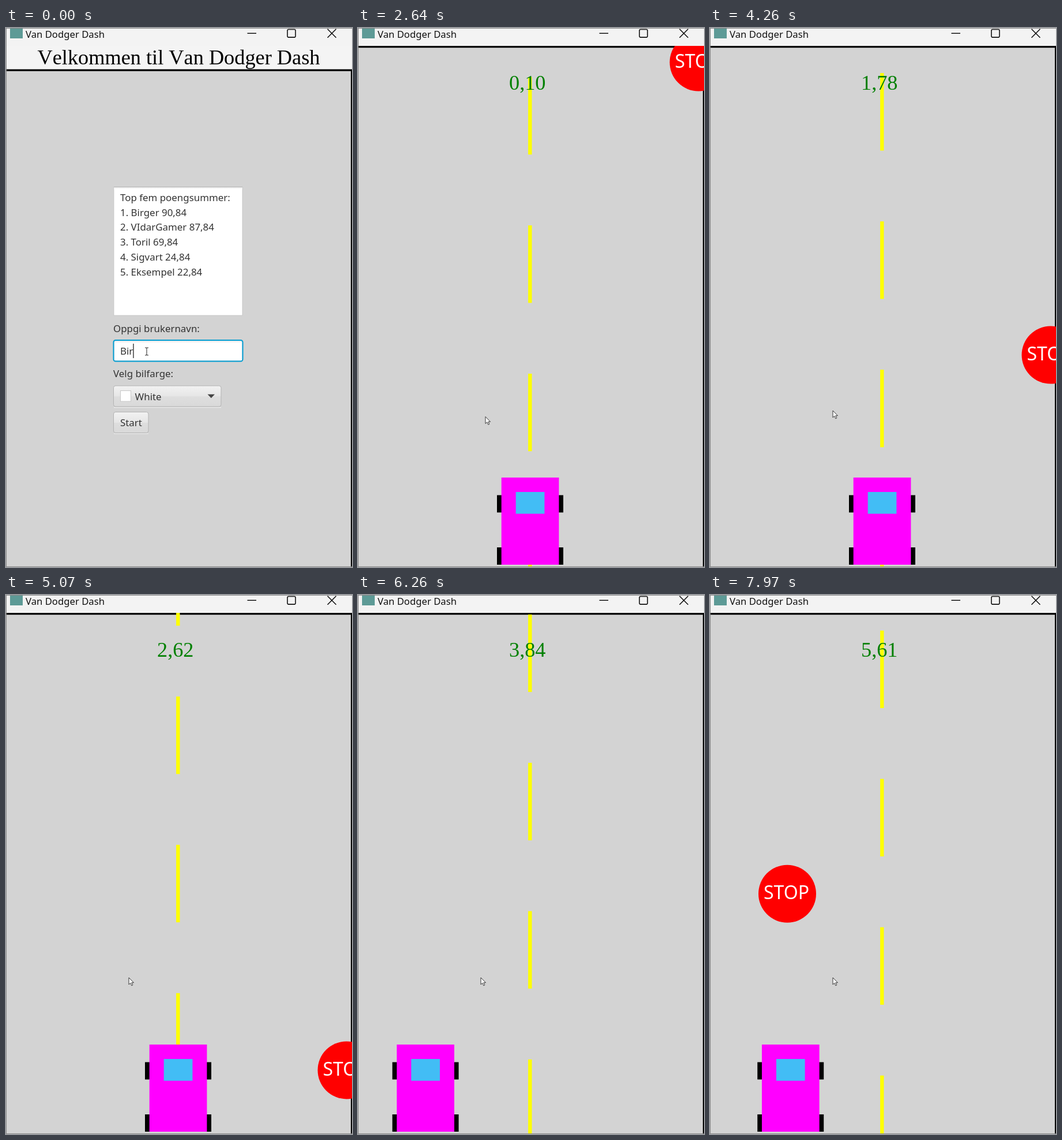
An HTML page for the animation above (8000 ms loop, 600 px wide and 934 px high).

```html
<!DOCTYPE html>
<html lang="no">
<head>
<meta charset="utf-8">
<title>Van Dodger Dash</title>
<style>
  html, body { margin: 0; width: 100%; height: 100%; overflow: hidden; background: #d3d3d3; }
  svg { display: block; width: 100vw; height: 100vh; }
  text { font: 16.9px "Noto Sans", sans-serif; fill: #333; white-space: pre; }
  .serif { font: 36.3px "Liberation Serif", serif; font-kerning: none; fill: #000; }
  .score { fill: #008000; }
  .stop { font-size: 32px; fill: #fff; }
  .btn { fill: url(#face); stroke: #b3b3b3; }
  .pressed { filter: brightness(.93); }
  #ring { fill: none; stroke: #039ed3; stroke-width: 2; }
  #pick { stroke: #1a9bcb; stroke-width: 2; filter: drop-shadow(0 0 2px #039ed3aa); }
</style>
</head>
<body>
<svg viewBox="0 0 600 934">
  <defs>
    <linearGradient id="face" x2="0" y2="1">
      <stop offset="0" stop-color="#f2f2f2"/>
      <stop offset=".5" stop-color="#e6e6e6"/>
      <stop offset=".52" stop-color="#dedede"/>
      <stop offset="1" stop-color="#d9d9d9"/>
    </linearGradient>
    <linearGradient id="inset" x2="0" y2="1">
      <stop offset="0" stop-color="#e8e8e8"/>
      <stop offset="1" stop-color="#fff"/>
    </linearGradient>
    <filter id="shadow" x="-10%" y="-10%" width="120%" height="120%">
      <feDropShadow dx="0" dy="0" stdDeviation="2.5" flood-opacity=".4"/>
    </filter>
    <clipPath id="view"><rect y="31" width="600" height="903"/></clipPath>
    <g id="sign">
      <circle r="50" fill="red"/>
      <text class="stop" x="-41" y="9.5">STOP</text>
    </g>
  </defs>

  <rect width="600" height="934" fill="#d3d3d3"/>
  <rect width="600" height="31" fill="#f3f3f3"/>

  <g id="menu">
    <rect y="31" width="600" height="41" fill="#f4f4f4"/>
    <rect y="71.5" width="600" height="3.2"/>
    <rect x="598" y="72" width="2" height="862"/>
    <text class="serif" x="54.5" y="63">Velkommen til Van Dodger Dash</text>

    <rect x="187" y="275.5" width="223" height="222.5" fill="#fff" stroke="#c4c4c4" stroke-width=".8"/>
    <rect x="187.5" y="275.5" width="222" height="4" fill="url(#inset)"/>
    <path d="M187 275.5h223" stroke="#b5b5b5"/>
    <g id="list"></g>

    <text x="186" y="526.7">Oppgi brukernavn:</text>
    <rect x="187" y="541.5" width="223" height="35.5" rx="3" fill="#fff" stroke="#bdbdbd"/>
    <rect x="188" y="542" width="221.5" height="4" fill="url(#inset)"/>
    <text id="field" x="198" y="566"></text>
    <rect id="caret" y="547" width="1.3" height="25" fill="#222"/>

    <text x="186" y="605.3">Velg bilfarge:</text>
    <rect x="187" y="657" width="186" height="1.2" fill="#ececec"/>
    <rect id="picker" class="btn" x="186.5" y="620" width="186.5" height="36" rx="3.5"/>
    <rect id="swatch" x="198.5" y="628.5" width="18" height="18.5" stroke="#c8c8c8"/>
    <text id="colour" x="223.5" y="644.5"></text>
    <path d="M349.5 634.8h12.5l-6.2 6.4z" fill="#444"/>

    <rect x="187" y="702.3" width="60" height="1.2" fill="#ececec"/>
    <rect id="start" class="btn" x="186.5" y="665.5" width="60.5" height="36" rx="3.5"/>
    <text x="198" y="690">Start</text>
    <rect id="ring" x="186.5" height="36.5" rx="3.5"/>

    <g id="popup">
      <rect x="187.5" y="658" width="325" height="300" rx="8" fill="#f0f0f0" filter="url(#shadow)"/>
      <rect x="188" y="702" width="324" height="10" fill="#e8e8e8"/>
      <g id="cells"></g>
      <rect id="pick" width="36" height="36"/>
    </g>
  </g>

  <g id="game">
    <rect y="31" width="600" height="3.2"/>
    <rect x="598" y="31" width="2" height="903"/>
    <g clip-path="url(#view)">
      <g id="road" fill="#ff0"></g>
      <g id="car">
        <path d="M-7.7 809.5h115v30h-115zM-7.7 900h115v30h-115z"/>
        <rect y="779" width="99.7" height="151" fill="#f0f"/>
        <rect x="25" y="804" width="49.7" height="37.7" fill="#42bdf5"/>
      </g>
      <use id="right" href="#sign"/>
      <use id="left" href="#sign"/>
      <text id="score" class="serif score" x="262" y="107"></text>
    </g>
  </g>

  <rect x="7" y="1" width="22" height="17" fill="#5d9a96"/>
  <text x="34" y="17" style="font-size:16.7px;fill:#111">Van Dodger Dash</text>
  <g fill="none" stroke="#111" stroke-width="1.6">
    <path d="M418.5 9.3h15.5M557.5 1.7l15 15M572.5 1.7l-15 15"/>
    <rect x="488" y="2.5" width="14" height="13.6" rx="2"/>
  </g>
  <path d="M0 .5H600M.5 0V934M0 933.5H600" stroke="#888" fill="none"/>

  <path id="beam" d="M-3-6.5h2l1 1 1-1h2M0-5.5v11M-3 6.5h2l1-1 1 1h2" fill="none" stroke="#333" stroke-width="1.1"/>
  <path id="arrow" d="M0 0v12l2.8-2.6 2 4.4 2-.9-2-4.1h3.7z" fill="#fff" stroke="#222" stroke-width=".9"/>
</svg>

<script>
const LOOP = 8000, PLAY = 2500, REFRESH = 133, PITCH = 24.2, DASH_GAP = 257;
const $ = id => document.getElementById(id);
const set = (el, attrs) => { for (const k in attrs) el.setAttribute(k, attrs[k]); };
const add = (parent, tag, attrs) => {
  const el = document.createElementNS('http://www.w3.org/2000/svg', tag);
  set(el, attrs);
  return parent.appendChild(el);
};
const show = (id, on) => { $(id).style.display = on ? '' : 'none'; };
const place = (id, x, y) => set($(id), { transform: `translate(${x} ${y})` });
const ramp = (t, a, b) => Math.min(1, Math.max(0, (t - a) / (b - a)));
const latest = (keys, t) => keys.filter(k => k[0] <= t).pop();

// [time, value]
const scores = [[PLAY, 0], [2640, .1], [3450, .93], [5070, 2.62], [6260, 3.84], [7970, 5.61]];
const typed = [[0, 'Bir'], [120, 'Birge'], [270, 'Birger']];
const mouse = [[0, 244, 560.5], [850, 282, 566], [970, 294, 616], [1280, 290, 642],
               [1520, 314, 684], [1910, 221, 673.5], [2790, 213, 663]];

['Top fem poengsummer:', '1. Birger 90,84', '2. VIdarGamer 87,84', '3. Toril 69,84',
 '4. Sigvart 24,84', '5. Eksempel 22,84'].forEach((s, i) => {
  add($('list'), 'text', { x: 198, y: 300 + i * 25.7 }).textContent = s;
});

const cell = (col, y, fill) =>
  add($('cells'), 'rect', { x: 205.3 + col * PITCH, y, width: 22.9, height: 22.9, fill });
const rgb = parts => `rgb(${parts.map(v => Math.min(255, Math.round(v)))})`;

'aqua teal blue navy magenta purple red maroon yellow olive green lime'.split(' ')
  .forEach((name, i) => cell(i, 676.5, name));

// Greys first, then eight rows, each one step lighter than the row above
'003333 001a80 1a0068 330033 4d001a 990000 993300 994d00 996600 999900 666600 003300'
  .split(' ').forEach((hex, col) => {
    const base = hex.match(/../g).map(h => parseInt(h, 16));
    const grey = 255 - 25.5 * Math.max(col - 1, col / 2);
    cell(col, 717, rgb([grey, grey, grey]));
    for (let r = 0; r < 8; r++)
      cell(col, 717 + (r + 1) * PITCH, rgb(base.map(v => v + r * 25.5)));
  });

const dashes = Array.from({ length: 6 }, () =>
  add($('road'), 'rect', { x: 295.1, width: 6.4, height: 134.3 }));

// The game picture refreshes in even steps between two score keys
function scoreAt(t) {
  const i = scores.findIndex(k => k[0] > t);
  if (i < 0) return scores[scores.length - 1][1];
  const [a, from] = scores[i - 1], [b, to] = scores[i];
  const n = Math.round((b - a) / REFRESH);
  return from + (to - from) * Math.floor(n * (t - a) / (b - a)) / n;
}

function drawMenu(t) {
  const picked = t >= 1670, open = t >= 1400 && !picked, hover = t >= 1520;
  const onField = t < 1280, onStart = t >= 2220;

  $('field').textContent = latest(typed, t)[1];
  set($('caret'), { x: 198 + $('field').getComputedTextLength() });
  show('caret', t < 850);

  $('colour').textContent = picked ? 'Magenta' : 'White';
  set($('swatch'), { fill: picked ? '#f0f' : '#fff' });
  set($('ring'), {
    y: onField ? 541 : onStart ? 665.5 : 620,
    width: onField ? 224 : onStart ? 60.5 : 187
  });
  $('picker').classList.toggle('pressed', open);
  $('start').classList.toggle('pressed', onStart && t < 2360);

  show('popup', open);
  set($('pick'), { x: hover ? 295.5 : 198.5, y: hover ? 670 : 716.5, fill: hover ? '#f0f' : '#fff' });
}

function drawGame(t) {
  const score = scoreAt(t), s = score - .1;
  const travel = s * (302 + .45 * s);
  // The lane markings slip once
  const phase = (travel + (t < 4340 ? 85 : 183)) % DASH_GAP;
  dashes.forEach((el, i) => set(el, { y: phase + (i - 1) * DASH_GAP }));

  // The car moves sideways in 7.5 px nudges
  const nudges = Math.round(3 * ramp(t, 7300, 7850)) - Math.round(24 * ramp(t, 5450, 6200));
  place('car', 248.7 + nudges * 7.56, 0);
  place('right', 590.5, 59.5 + travel);
  place('left', 134, travel - 1160);
  $('score').textContent = score.toFixed(2).replace('.', ',');
}

function draw(t) {
  const playing = t >= PLAY, overField = t < 970;
  show('menu', !playing);
  show('game', playing);
  (playing ? drawGame : drawMenu)(t);

  const [, x, y] = latest(mouse, t);
  show('beam', overField);
  show('arrow', !overField);
  place(overField ? 'beam' : 'arrow', x, y);
}

const begin = performance.now();
function frame() {
  draw((performance.now() - begin) % LOOP);
  requestAnimationFrame(frame);
}
frame();
</script>
</body>
</html>
```
